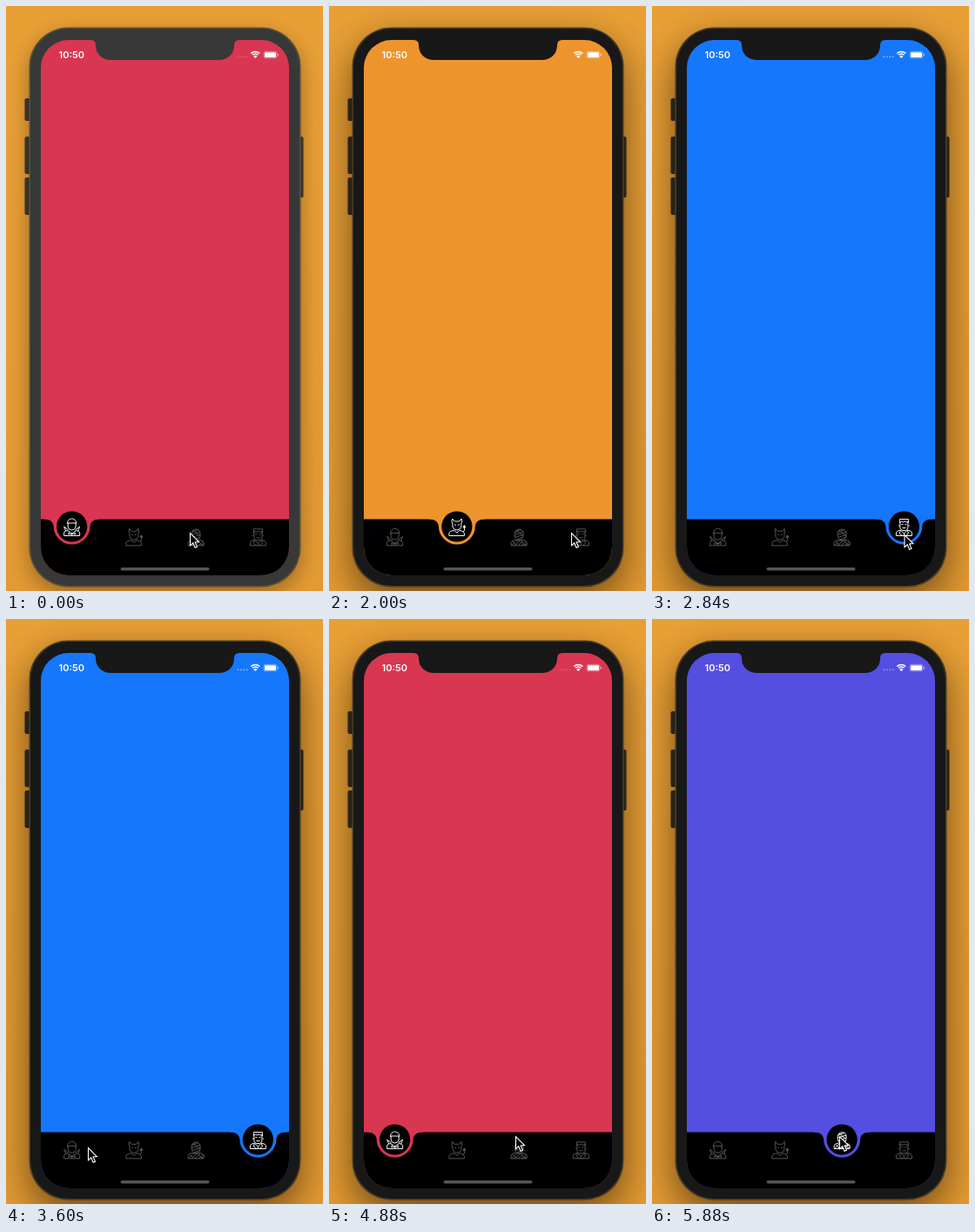
Recreate the animation shown at these times as an HTML page with a canvas. Size 364 px wide and 672 px high, loop 5.92 s.

```html
<!DOCTYPE html>
<html lang="en">
<head>
<meta charset="utf-8">
<title>Tab bar</title>
<style>
  html, body { margin: 0; width: 100%; height: 100%; overflow: hidden; background: #e69e35; }
  canvas { display: block; width: 364px; height: 672px; }
</style>
</head>
<body>
<canvas id="stage"></canvas>
<script>
const W = 364, H = 672, LOOP = 5920, MOVE = 500, BAR = 589.5;
const canvas = document.getElementById('stage');
const dpr = window.devicePixelRatio || 1;
canvas.width = W * dpr;
canvas.height = H * dpr;
const ctx = canvas.getContext('2d');

const tabX = i => 40 + 285 * (i + 0.5) / 4;
const screens = ['#d93651', '#ee942d', '#544fe1', '#1577fb'];
const screenOf = [0, 1, 3, 2];             // tab -> screen colour
const dotAlpha = [0.14, 0, 0.3, 0.4];      // signal dots per tab
const taps = [
  { at: 670, from: 0, to: 1 },
  { at: 2236, from: 1, to: 3 },
  { at: 3760, from: 3, to: 0 },
  { at: 5240, from: 0, to: 2 }
];
const ACTIVE_AT = 640;

// time, x, y of the pointer tip
const pointer = [
  [0, 211, 605], [160, 211, 605], [600, 141, 614], [1260, 141, 614],
  [1960, 278, 605], [2000, 278, 605], [2200, 291, 607], [2800, 291, 607],
  [3600, 94, 607], [3720, 80, 608], [4100, 80, 606], [4780, 214, 594],
  [5920, 215, 594]
];

const clamp = v => Math.max(0, Math.min(1, v));
const ease = v => { v = clamp(v); return v * v * (3 - 2 * v); };
const span = (v, a, b) => ease((v - a) / (b - a));
const mix = (a, b, k) => a + (b - a) * k;

function rounded(x, y, w, h, r) {
  ctx.beginPath();
  ctx.roundRect(x, y, w, h, r);
}

function box(x, y, w, h, r, fill) {
  rounded(x, y, w, h, r);
  ctx.fillStyle = fill;
  ctx.fill();
}

function circle(x, y, r, fill) {
  ctx.beginPath();
  ctx.arc(x, y, r, 0, Math.PI * 2);
  ctx.fillStyle = fill;
  ctx.fill();
}

function drawBody(active) {
  const bg = ctx.createLinearGradient(0, 0, 0, H);
  bg.addColorStop(0, '#e89f36');
  bg.addColorStop(1, '#e39a33');
  ctx.fillStyle = bg;
  ctx.fillRect(0, 0, W, H);

  ctx.save();
  ctx.shadowColor = active ? 'rgba(40,22,0,.62)' : 'rgba(40,22,0,.4)';
  ctx.shadowBlur = (active ? 44 : 24) * dpr;
  ctx.shadowOffsetY = (active ? 16 : 8) * dpr;
  box(27, 25, 311, 642, 45, '#222');
  ctx.restore();

  const key = active ? '#292318' : '#38332b';
  for (const [x, y, w, h] of [[21.5, 106, 7, 26], [21.5, 150, 7, 43], [21.5, 197, 7, 43], [336, 150, 5.5, 70]])
    box(x, y, w, h, 2, key);

  box(26.5, 24.5, 312, 643, 45, active ? '#4b3d26' : '#5d5038');
  box(28, 26, 309, 640, 44, active ? '#181818' : '#383838');
}

// the notch of the phone, filled in the body colour
function drawNotch(fill) {
  ctx.beginPath();
  ctx.moveTo(97, 38);
  ctx.lineTo(97, 39);
  ctx.quadraticCurveTo(103, 39, 103, 45);
  ctx.bezierCurveTo(103, 55, 110, 62, 121, 62);
  ctx.lineTo(244, 62);
  ctx.bezierCurveTo(255, 62, 262, 55, 262, 45);
  ctx.quadraticCurveTo(262, 39, 268, 39);
  ctx.lineTo(268, 38);
  ctx.fillStyle = fill;
  ctx.fill();
}

function drawStatus(dots) {
  ctx.fillStyle = '#fff';
  ctx.font = '600 11px Inter, "Liberation Sans", sans-serif';
  ctx.fillText('10:50', 60.5, 60);
  for (let i = 0; i < 4; i++) circle(266.3 + i * 3.5, 58.3, 1.1, `rgba(255,255,255,${dots})`);

  ctx.strokeStyle = '#fff';
  ctx.lineWidth = 1.5;
  for (const r of [7.2, 4.7]) {
    ctx.beginPath();
    ctx.arc(286.3, 59.6, r, -Math.PI * 0.75, -Math.PI * 0.25);
    ctx.stroke();
  }
  ctx.beginPath();
  ctx.moveTo(286.3, 60);
  ctx.arc(286.3, 60, 3, -Math.PI * 0.75, -Math.PI * 0.25);
  ctx.fillStyle = '#fff';
  ctx.fill();

  rounded(296, 52.3, 15, 7.6, 2.2);
  ctx.strokeStyle = 'rgba(255,255,255,.5)';
  ctx.lineWidth = 0.8;
  ctx.stroke();
  box(297, 53.2, 13, 5.8, 1.3, '#fff');
  box(311.8, 54.8, 1, 2.6, 0.5, 'rgba(255,255,255,.6)');
}

function drawHole(c, depth, fill) {
  if (depth <= 0) return;
  ctx.save();
  ctx.translate(c, BAR);
  ctx.scale(1, depth);
  ctx.beginPath();
  ctx.moveTo(-32, -1);
  ctx.lineTo(-32, 0);
  ctx.bezierCurveTo(-25, 0, -21.5, 3, -21, 8);
  ctx.arc(0, 8, 21, Math.PI, 0, true);
  ctx.bezierCurveTo(21.5, 3, 25, 0, 32, 0);
  ctx.lineTo(32, -1);
  ctx.fillStyle = fill;
  ctx.fill();
  ctx.restore();
}

// line icons, drawn around their own centre
const icons = [
  'M-5 -4C-6 -12 6 -12 5 -4M-5 -5H5M-4.5 -5V-1Q-4 3 0 3Q4 3 4.5 -1V-5' +
  'M-9 9.5V6Q-9 4 -5 3.5L0 7L5 3.5Q9 4 9 6V9.5Z' +
  'M-4 3L-9 -1L-7 4M4 3L9 -1L7 4M0 7V9.5M-3 5L-4 8L0 7L4 8L3 5',
  'M-5 -5Q-7 -7 -5 -10Q-4 -7 -2 -7H2Q4 -7 5 -10Q7 -7 5 -5V-1Q4 3 0 3Q-4 3 -5 -1Z' +
  'M-3 -3.5L-1 -2.5M3 -3.5L1 -2.5M-9 9.5V7Q-9 4 -3 3.5L0 6L3 3.5Q8 4 8.5 7V9.5Z' +
  'M7 5Q10 4 8.5 1V-2M7 0L8.5 -2.5L10 0Z',
  'M-5 -4C-5 -11 5 -11 5 -4C5 0 4 3 0 3C-4 3 -5 0 -5 -4Z' +
  'M-4.5 -6L3 -9M-5 -3L5 -6M-4 0L5 -3M-2 2.5L4 0M-3 -8L4 -2' +
  'M-9 9.5V6Q-9 4 -4 3L0 4L4 3Q9 4 9 6V9.5Z' +
  'M-8 9L-3 4M-5 9.5L1 4M-1 9.5L5 4M3 9.5L8 5M6 9.5L9 7M-7 5L-3 9M2 4L7 9',
  'M-5 -5V-9.5H5V-5M-5 -6L-3 -7L-1 -6L1 -7L3 -6L5 -7M-4.5 -6V1L-2 3.5H2L4.5 1V-6' +
  'M-3 -3.5H-1M1 -3.5H3M-2 0.5H2M-5 -2H-6.5M5 -2H6.5' +
  'M-9 9.5V6Q-9 4 -4 3L0 7L4 3Q9 4 9 6V9.5ZM-4 3L-5 7L-2 9.5M4 3L5 7L2 9.5M0 7V9.5'
].map(d => new Path2D(d));

function drawIcon(i, up) {
  const shade = Math.round(mix(112, 255, up));
  ctx.save();
  ctx.translate(tabX(i), mix(610.3, 599, up));
  ctx.strokeStyle = `rgb(${shade},${shade},${shade})`;
  ctx.lineWidth = mix(0.75, 0.95, up);
  ctx.lineJoin = 'round';
  ctx.stroke(icons[i]);
  ctx.restore();
}

function drawPointer(t) {
  let k = 1;
  while (k < pointer.length - 1 && pointer[k][0] < t) k++;
  const [t0, x0, y0] = pointer[k - 1], [t1, x1, y1] = pointer[k];
  const p = span(t, t0, t1);
  ctx.save();
  ctx.translate(mix(x0, x1, p), mix(y0, y1, p));
  ctx.beginPath();
  ctx.moveTo(0.5, 0.5);
  ctx.lineTo(0.5, 14.8);
  ctx.lineTo(3.7, 11.8);
  ctx.lineTo(6.1, 17.3);
  ctx.lineTo(8.5, 16.3);
  ctx.lineTo(6.1, 10.9);
  ctx.lineTo(10.4, 10.6);
  ctx.closePath();
  ctx.fillStyle = '#000';
  ctx.fill();
  ctx.strokeStyle = '#fff';
  ctx.lineWidth = 1.1;
  ctx.stroke();
  ctx.restore();
}

function tabState(t) {
  let tap = { at: -MOVE, from: 0, to: 0 };
  for (const next of taps) if (t >= next.at) tap = next;
  const u = clamp((t - tap.at) / MOVE);
  const up = [0, 0, 0, 0];
  up[tap.from] = 1 - span(u, 0.32, 0.62);
  up[tap.to] = Math.max(up[tap.to] * (tap.from === tap.to), span(u, 0.55, 0.95));
  return {
    tab: tap.to,
    up,
    ballX: mix(tabX(tap.from), tabX(tap.to), ease(u)),
    ballR: 17.6 * (1 - 0.53 * (span(u, 0, 0.25) - span(u, 0.72, 1)))
  };
}

function draw(t) {
  const active = t >= ACTIVE_AT;
  const s = tabState(t);
  const fill = screens[screenOf[s.tab] === 3 ? 2 : screenOf[s.tab] === 2 ? 3 : screenOf[s.tab]];
  ctx.setTransform(dpr, 0, 0, dpr, 0, 0);
  drawBody(active);

  ctx.save();
  rounded(40, 39, 285, 615, 32);
  ctx.clip();
  ctx.fillStyle = fill;
  ctx.fillRect(40, 39, 285, 615);
  ctx.fillStyle = '#000';
  ctx.fillRect(40, BAR, 285, 65);
  s.up.forEach((depth, i) => drawHole(tabX(i), depth, fill));
  circle(s.ballX, 598, s.ballR, '#000');
  s.up.forEach((up, i) => drawIcon(i, up));
  box(131.5, 645, 102, 3.4, 1.7, '#555');
  ctx.restore();

  drawNotch(active ? '#181818' : '#383838');
  drawStatus(dotAlpha[s.tab]);
  drawPointer(t);
}

const start = performance.now();
function tick() {
  draw((performance.now() - start) % LOOP);
  requestAnimationFrame(tick);
}
tick();
</script>
</body>
</html>
```
